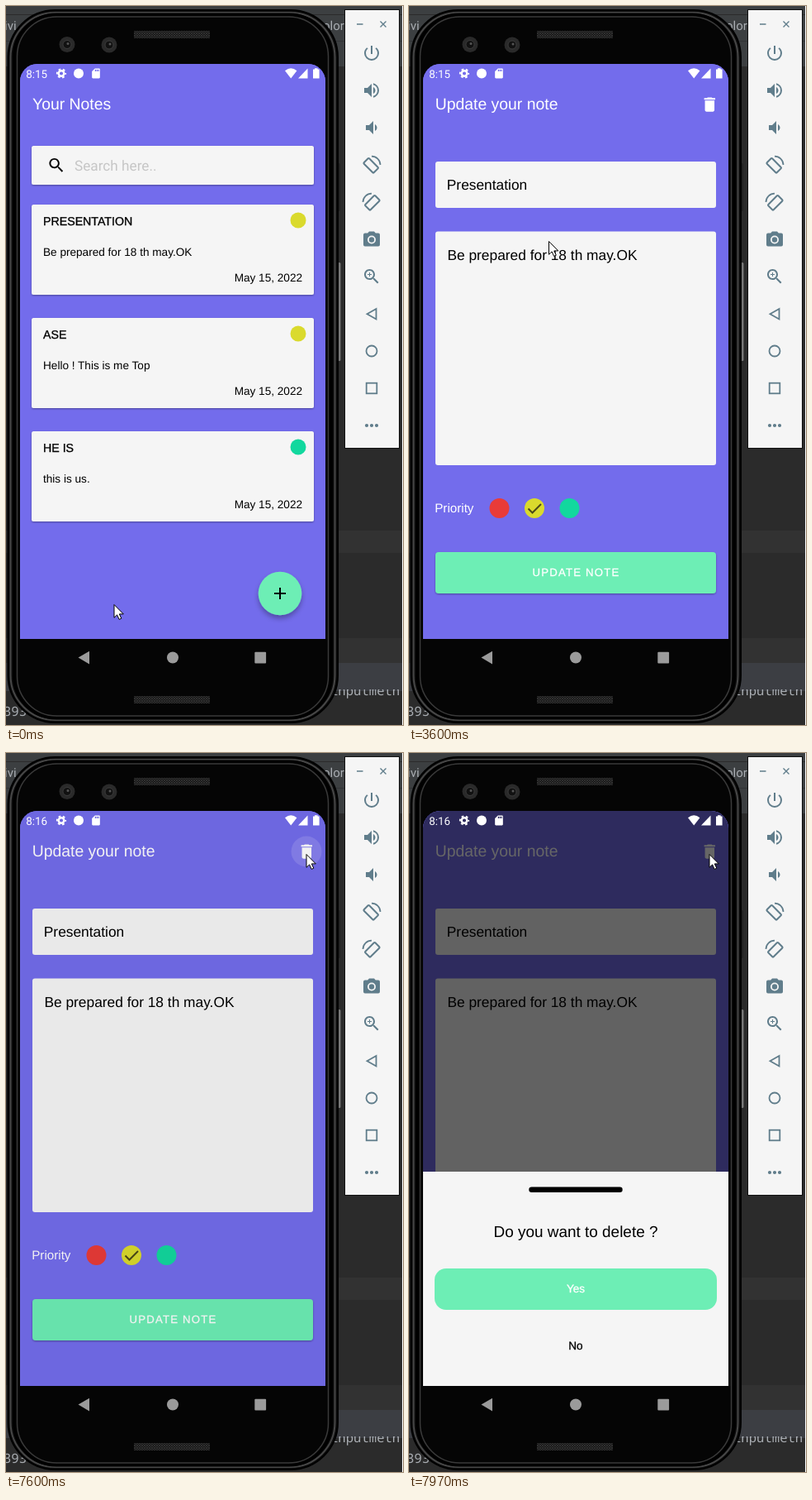
An HTML page that plays this animation: 481x869 px, repeating every 8 s.

```html
<!DOCTYPE html>
<html lang="en">
<head>
<meta charset="utf-8">
<title>Notes app</title>
<style>
html, body { margin: 0; width: 100%; height: 100%; overflow: hidden; background: #2b2b2b; }
svg { display: block; width: 100vw; height: 100vh; }
text { font-family: "Liberation Sans", Arial, sans-serif; white-space: pre; text-rendering: geometricPrecision; }
.rob { font-family: Roboto, sans-serif; }
.mono { font-family: "Noto Sans Mono", monospace; }
.med { stroke: currentColor; stroke-width: .3; }
.mid { text-anchor: middle; }
.end { text-anchor: end; }
.body { font-size: 13.6px; }
.head { font-size: 19.4px; fill: #fff; }
.field { font-size: 17.35px; }
.paper { fill: #f5f5f5; }
.line { fill: none; stroke: #607d8b; }
</style>
</head>
<body>
<svg viewBox="0 0 481 869" xmlns="http://www.w3.org/2000/svg">
  <defs>
    <clipPath id="screen"><path d="M17 91a21 21 0 0 1 21-21h328a21 21 0 0 1 21 21V815H17z"/></clipPath>
    <clipPath id="codeRow"><rect x="380" y="826" width="101" height="20"/></clipPath>
    <filter id="soft" x="-20%" y="-20%" width="140%" height="150%">
      <feDropShadow dx="0" dy="1" stdDeviation=".8" flood-opacity=".35"/>
    </filter>
    <filter id="lift" x="-30%" y="-30%" width="160%" height="170%">
      <feDropShadow dx="0" dy="4" stdDeviation="3" flood-opacity=".3"/>
    </filter>
    <pattern id="mesh" width="3" height="3" patternUnits="userSpaceOnUse">
      <rect width="3" height="3" fill="#171717"/>
      <path d="M0 0L3 3M3 0L0 3" stroke="#3a3a3a" stroke-width=".7"/>
    </pattern>
  </defs>

  <!-- editor behind the phone -->
  <rect width="481" height="869" fill="#2b2b2b"/>
  <rect width="481" height="73" fill="#3c3f41"/>
  <rect y="10" width="481" height="1" fill="#2b2b2b"/>
  <rect y="42" width="481" height="1" fill="#313335"/>
  <rect y="634" width="481" height="27" fill="#323232"/>
  <rect y="764" width="481" height="30" fill="#323232"/>
  <rect y="794" width="481" height="34" fill="#3c3e43"/>
  <g fill="#a9adb2" font-size="15">
    <text class="rob" x="-2" y="29">ivi</text>
    <text class="rob" x="384" y="29">olor</text>
    <text class="mono" x="393" y="833" font-size="15.6" clip-path="url(#codeRow)">inputmeth</text>
    <text class="mono" x="-3" y="858" font-size="15.6">393</text>
  </g>

  <!-- phone body -->
  <rect x="402" y="310" width="3.5" height="119" rx="1.5" fill="#777"/>
  <rect x="402" y="190" width="3" height="58" rx="1.5" fill="#222"/>
  <rect x="2.5" y="5" width="399.5" height="861" rx="57" fill="#0d0d0d" stroke="#000" stroke-width="2"/>
  <rect x="5.5" y="8" width="393" height="855" rx="54" fill="none" stroke="#474747" stroke-width="2"/>
  <rect x="10" y="10.5" width="384" height="850" rx="51" fill="#050505" stroke="#000" stroke-width="4"/>
  <rect x="13.5" y="13" width="377" height="845" rx="48" fill="#050505" stroke="#3a3a3a" stroke-width="1.5"/>
  <rect x="155" y="30" width="92" height="9" rx="1" fill="url(#mesh)"/>
  <rect x="155" y="834" width="92" height="9" rx="1" fill="url(#mesh)"/>
  <g id="lenses"></g>

  <g clip-path="url(#screen)">
    <rect x="17" y="70" width="370" height="745" fill="#050505"/>
    <rect x="17" y="70" width="370" height="695" fill="#736cec"/>

    <g id="list">
      <rect x="17" y="70" width="370" height="695" fill="#736cec"/>
      <text class="head" x="32" y="125">Your Notes</text>
      <rect class="paper" x="31" y="169" width="342" height="47" rx="2.5" filter="url(#soft)"/>
      <g id="searchIcon"></g>
      <text class="rob" x="83" y="199" font-size="17.2" fill="#c6c6c6">Search here..</text>
      <g id="cards"></g>
      <circle cx="332" cy="710" r="26.3" fill="#6deeb5" filter="url(#lift)"/>
      <path d="M325 710h14M332 703v14" stroke="#000" stroke-width="2"/>
    </g>

    <g id="edit">
      <rect x="17" y="70" width="370" height="695" fill="#736cec"/>
      <text class="head" x="31.7" y="125">Update your note</text>
      <g id="trash"></g>
      <rect class="paper" x="32" y="188" width="340" height="56" rx="3"/>
      <text class="field" x="45.8" y="222">Presentation</text>
      <rect class="paper" x="32" y="272.5" width="340" height="282.5" rx="3"/>
      <text class="field" x="46.4" y="307">Be prepared for 18 th may.OK</text>
      <text x="31.2" y="612" font-size="15.2" fill="#fff">Priority</text>
      <circle cx="109.5" cy="607" r="12" fill="#e93b38"/>
      <circle cx="152" cy="607" r="12" fill="#dada2d"/>
      <circle cx="194.5" cy="607" r="12" fill="#12d89e"/>
      <path d="M144.5 607.5l5 5 10.5-10.5" fill="none" stroke="#4b4a18" stroke-width="2"/>
      <rect x="32" y="660" width="340" height="50" rx="4" fill="#6deeb5" filter="url(#soft)"/>
      <text class="mid med" x="202.5" y="689" font-size="13.2" letter-spacing="1.18" fill="#fff" color="#fff">UPDATE NOTE</text>
      <circle id="ripple" cx="364" cy="119" r="0" fill="#fff"/>
    </g>

    <rect id="dim" x="17" y="70" width="370" height="695"/>

    <g id="sheet">
      <rect class="paper" x="17" y="506" width="370" height="259"/>
      <rect x="145.3" y="524.6" width="113.4" height="6.4" rx="3.2"/>
      <text class="mid" x="202" y="585" font-size="18.95">Do you want to delete ?</text>
      <rect x="31" y="623" width="342" height="50" rx="14" fill="#6deeb5"/>
      <text class="mid body med" x="202" y="652" fill="#fff" color="#fff">Yes</text>
      <text class="mid body med" x="202" y="721">No</text>
    </g>
  </g>

  <!-- status bar -->
  <g fill="#fff">
    <text id="clock" class="rob" x="24.3" y="86.5" font-size="13.4">8:15</text>
    <circle cx="67" cy="81.5" r="3.3" fill="none" stroke="#fff" stroke-width="2.5"/>
    <circle cx="67" cy="81.5" r="5.2" fill="none" stroke="#fff" stroke-width="1.8" stroke-dasharray="2.72" stroke-dashoffset="1.36"/>
    <circle cx="88" cy="81.5" r="6"/>
    <g id="sdIcon"></g>
    <path d="M338 78.2q7.2-6 14.4 0L345.2 87.5z"/>
    <path d="M365.5 75.5V87.5H354z"/>
    <path d="M374 75.2h3.6v1.3h2v11h-7.6v-11h2z"/>
  </g>

  <!-- navigation bar -->
  <g fill="#fff" opacity=".6">
    <path d="M87.5 787.5L101 779.7V795.5z"/>
    <circle cx="202" cy="787.5" r="7"/>
    <rect x="301.3" y="780.7" width="13.8" height="13.8" rx="1"/>
  </g>

  <!-- emulator panel -->
  <rect x="410.5" y="4.5" width="66" height="530" fill="#f5f5f5" stroke="#101010"/>
  <g id="tools" fill="#607d8b"></g>
  <g class="line" stroke-width="1.8">
    <path d="M425 22h7.5M453.500 18.5l7 7m0-7l-7 7" stroke-width="1.4"/>
    <path d="M448.5 366V378.5L437.5 372.2z"/>
    <circle cx="443" cy="417" r="6.5"/>
    <rect x="436.7" y="455.7" width="12.6" height="12.6"/>
  </g>

  <rect x="480" width="1" height="869" fill="#fff"/>
  <path id="cursor" d="M.5.5V16.3L4.1 12.9 6.6 18.4 9.3 17.2 6.8 11.9H11.8z" fill="#fff" stroke="#000"/>
</svg>

<script>
const $ = id => document.getElementById(id);

const glass = 'M15.5 14h-.79l-.28-.27C15.41 12.59 16 11.11 16 9.5 16 5.91 13.09 3 9.5 3S3 5.91 3 9.5 5.91 16 9.5 16c1.61 0 3.09-.59 4.23-1.57l.27.28v.79l5 4.99L20.49 19l-4.99-5zm-6 0C7.01 14 5 11.99 5 9.5S7.01 5 9.5 5 14 7.01 14 9.5 11.99 14 9.5 14z';
const shapes = {
  search: glass,
  zoom: glass + 'M12 10h-2v2H9v-2H7V9h2V7h1v2h2v1z',
  bin: 'M6 19c0 1.1.9 2 2 2h8c1.1 0 2-.9 2-2V7H6v12zM19 4h-3.5l-1-1h-5l-1 1H5v2h14V4z',
  card: 'M18 2h-8L4 8v12c0 1.1.9 2 2 2h12c1.1 0 2-.9 2-2V4c0-1.1-.9-2-2-2zm-6 6h-2V4h2v4zm3 0h-2V4h2v4zm3 0h-2V4h2v4z',
  power: 'M13 3h-2v10h2V3zm4.83 2.17l-1.42 1.42C17.99 7.86 19 9.81 19 12a7 7 0 0 1-14 0c0-2.19 1.01-4.14 2.58-5.42L6.17 5.17C4.23 6.82 3 9.26 3 12a9 9 0 0 0 18 0c0-2.74-1.23-5.18-3.17-6.83z',
  loud: 'M3 9v6h4l5 5V4L7 9H3zm13.5 3c0-1.77-1.02-3.29-2.5-4.03v8.05c1.48-.73 2.5-2.25 2.5-4.02zM14 3.23v2.06a7 7 0 0 1 0 13.42v2.06a9 9 0 0 0 0-17.54z',
  quiet: 'M18.5 12c0-1.77-1.02-3.29-2.5-4.03v8.05c1.48-.73 2.5-2.25 2.5-4.02zM5 9v6h4l5 5V4L9 9H5z',
  camera: 'M9 2L7.17 4H4a2 2 0 0 0-2 2v12a2 2 0 0 0 2 2h16a2 2 0 0 0 2-2V6a2 2 0 0 0-2-2h-3.17L15 2H9zm3 15a5 5 0 0 1 0-10 5 5 0 0 1 0 10zm0-1.8a3.2 3.2 0 0 0 0-6.4 3.2 3.2 0 0 0 0 6.4z'
};

const icon = (name, x, y, size, fill = 'inherit') =>
  `<path d="${shapes[name]}" fill="${fill}" transform="translate(${x - size / 2} ${y - size / 2}) scale(${size / 24})"/>`;

const rotator = (y, flip) =>
  `<g class="line" stroke-width="2" transform="translate(443 ${y}) scale(${flip} 1)">
    <rect x="-4.5" y="-8.5" width="9" height="17" rx="1" transform="translate(-.8 .8) rotate(-45)"/>
    <path d="M0-10.300A10.500 10.500 0 0 1 10.500 0" stroke-width="1.700"/></g>`;

const noteCard = ([title, body, color], i) =>
  `<g transform="translate(0 ${240 + 137 * i})">
    <rect class="paper" x="31" width="342" height="109" rx="2.5" filter="url(#soft)"/>
    <text class="med" x="45" y="25" font-size="14.2">${title}</text>
    <text class="body" x="45" y="62">${body}</text>
    <text class="body end" x="359" y="93">May 15, 2022</text>
    <circle cx="354" cy="19" r="9.5" fill="${color}"/></g>`;

$('cards').innerHTML = [
  ['PRESENTATION', 'Be prepared for 18 th may.OK', '#dada2d'],
  ['ASE', 'Hello ! This is me Top', '#dada2d'],
  ['HE IS', 'this is us.', '#12d89e']
].map(noteCard).join('');

$('lenses').innerHTML = [[74, 46.5], [125, 47]].map(([x, y]) =>
  `<circle cx="${x}" cy="${y}" r="9.5" fill="#2a2a2a"/>
   <circle cx="${x}" cy="${y}" r="5" fill="#111" stroke="#3c3c3c"/>
   <circle cx="${x + 1}" cy="${y - 1}" r="1.5" fill="#555"/>`).join('');

$('searchIcon').innerHTML = icon('search', 61, 192.5, 23, '#000');
$('trash').innerHTML = icon('bin', 364.3, 119, 23, '#fff');
$('sdIcon').innerHTML = icon('card', 109, 81.5, 14.5);

$('tools').innerHTML =
  ['power', 'loud', 'quiet'].map((n, i) => icon(n, 443, 57 + 45 * i, 24)).join('') +
  rotator(192, 1) + rotator(237, -1) +
  icon('camera', 443, 282.5, 24) + icon('zoom', 443, 327, 24) +
  [-6, 0, 6].map(d => `<circle cx="${443 + d}" cy="507" r="2.1"/>`).join('');

// pointer gestures: start time, number of steps, end point
const moves = [
  [120, 3, 226, 462], [510, 3, 192, 329], [1250, 4, 169, 284],
  [5040, 2, 227, 178], [5310, 2, 262, 140], [5580, 2, 319, 128], [5850, 3, 363.5, 122]
];
// dialog opening: time, ripple radius, ripple alpha, dim, sheet progress
const opening = [
  [0, 0, 0, 0, 0], [7470, 13, .1, 0, 0], [7590, 18.5, .14, .05, 0],
  [7720, 18.5, .1, .28, .87], [7840, 18.5, .04, .48, 1], [7970, 0, 0, .6, 1]
];
const STEP = 120, LOOP = 8000;

function pointer(t) {
  let x = 130.5, y = 723;
  for (const [start, n, ex, ey] of moves) {
    if (t < start) break;
    const k = Math.min(n, Math.floor((t - start) / STEP) + 1) / n;
    x += (ex - x) * k;
    y += (ey - y) * k;
  }
  return [x, y];
}

function draw(t) {
  const editing = t >= 3600;
  const zoom = t < 3330 ? 1 : t < 3450 ? 1.0045 : 1.0173;
  $('list').setAttribute('transform', `translate(202 418) scale(${zoom}) translate(-202 -418)`);
  $('list').style.display = editing ? 'none' : '';
  $('edit').style.display = editing ? '' : 'none';
  $('clock').textContent = t < 6940 ? '8:15' : '8:16';

  const [, r, glow, dim, p] = opening.filter(s => s[0] <= t).pop();
  $('ripple').setAttribute('r', r);
  $('ripple').setAttribute('opacity', glow);
  $('dim').setAttribute('opacity', dim);
  $('sheet').setAttribute('opacity', p);
  $('sheet').setAttribute('transform', `translate(0 ${146 * (1 - p)})`);

  $('cursor').setAttribute('transform', `translate(${pointer(t)})`);
}

function tick() {
  draw(performance.now() % LOOP);
  requestAnimationFrame(tick);
}
tick();
</script>
</body>
</html>
```
